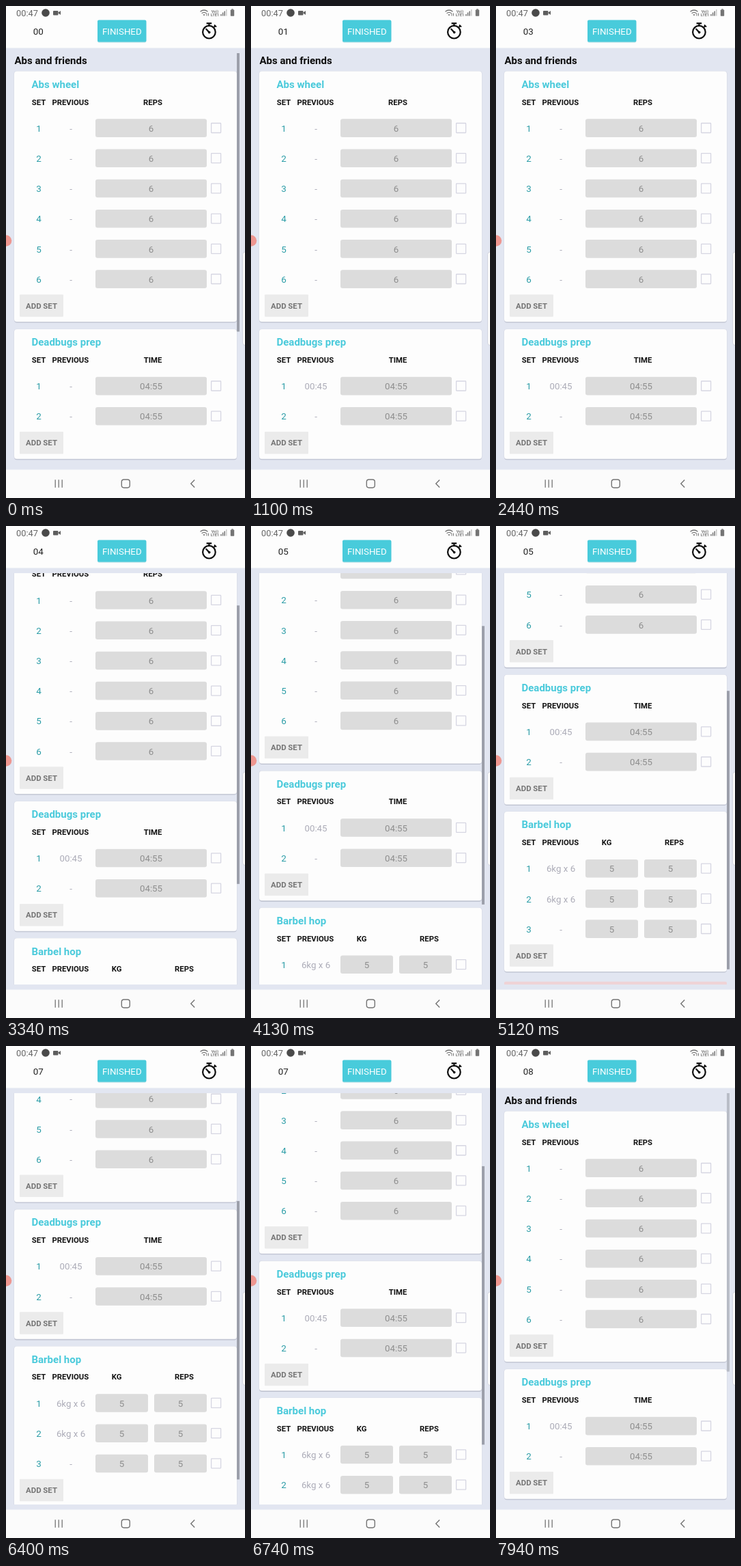
An HTML page that plays this animation: 350 px wide and 720 px high, repeating every 8 s.

```html
<!DOCTYPE html>
<html lang="en">
<head>
<meta charset="utf-8">
<title>Workout log</title>
<style>
html, body { margin: 0; width: 100%; height: 100%; overflow: hidden; background: #fbfbfb; }
svg { display: block; width: 350px; height: 720px; font-family: Roboto, Arial, sans-serif; }
</style>
</head>
<body>
<svg id="stage" viewBox="0 0 350 720" xmlns="http://www.w3.org/2000/svg"></svg>
<script>
const LOOP = 8000;
const ROW = 44.2;
const PAGE = '#e2e6f1', TEAL = '#4acadb', NUMBER = '#2a9ca6', FIELD = '#dcdcdc';
const MUTED = '#acacb8', VALUE = '#8e8e8e', ICON = '#747474';

const rect = (x, y, w, h, fill, r = 0, extra = '') =>
  `<rect x="${x}" y="${y}" width="${w}" height="${h}" rx="${r}" fill="${fill}" ${extra}/>`;
const path = (d, stroke, width, extra = '') =>
  `<path d="${d}" fill="none" stroke="${stroke}" stroke-width="${width}" ${extra}/>`;
// y is the middle of the capital letters
const text = (s, x, y, size, fill, weight = 400, anchor = 'middle', extra = '') =>
  `<text x="${x}" y="${(y + size * 0.355).toFixed(2)}" font-size="${size}" fill="${fill}" font-weight="${weight}" text-anchor="${anchor}" ${extra}>${s}</text>`;

// Each column: label, label x, field x, field width, value
function card(top, title, cols, prev) {
  const first = top + 83;
  const last = first + ROW * (prev.length - 1);
  const height = last + 62.5 - top;
  let out = rect(12, top + 1.6, 326, height, '#b4b8c6', 4, 'opacity=".8"')
    + rect(11.5, top - 0.3, 327, height + 0.8, '#d3d7e2', 4)
    + rect(12, top, 326, height, '#fdfdfd', 4)
    + text(title, 37.5, top + 19, 15, TEAL, 700, 'start')
    + text('SET', 48, top + 45, 11.3, '#111', 700)
    + text('PREVIOUS', 94.3, top + 45, 11.3, '#111', 700);
  for (const [label, x] of cols) out += text(label, x, top + 45, 11.3, '#111', 700);
  prev.forEach((p, i) => {
    const y = first + ROW * i;
    out += text(i + 1, 48, y + 0.5, 13.4, NUMBER)
      + text(p.s, 95, y + 0.5, 13.3, MUTED, 400, 'middle', p.id ? `id="${p.id}"` : '');
    for (const [, , x, w, v] of cols)
      out += rect(x, y - 13.2, w, 26.6, FIELD, 3) + text(v, x + w / 2, y + 0.5, 13.3, VALUE);
    out += rect(300.6, y - 7, 14, 14, 'none', 0.5, 'stroke="#d6d6e2" stroke-width="1.3"');
  });
  out += rect(20, last + 22.8, 64, 32.5, '#ebebeb', 1)
    + text('ADD SET', 52, last + 39.2, 11.4, '#757575', 700);
  return out;
}

const dash = () => ({ s: '-' });
const one = (label, v) => [[label, 215, 131, 163, v]];
const content = text('Abs and friends', 12.5, 80, 15, '#0c0c0c', 700, 'start')
  + card(95.5, 'Abs wheel', one('REPS', '6'), Array.from({ length: 6 }, dash))
  + card(473, 'Deadbugs prep', one('TIME', '04:55'), [{ s: '-', id: 'loaded' }, dash()])
  + card(673.3, 'Barbel hop', [['KG', 162, 131, 77, '5'], ['REPS', 261, 217, 77, '5']],
      [{ s: '6kg x 6' }, { s: '6kg x 6' }, dash()])
  + rect(12, 922, 326, 32, '#efd3d6', 2);

const statusBar = text('00:47', 15, 10.5, 12.8, '#666', 400, 'start')
  + '<circle cx="58" cy="10" r="5.8" fill="#4a4a4a"/>'
  + rect(69, 7, 7.5, 6.4, '#5e5e5e', 1) + '<path d="M76 10l4-3v6z" fill="#5e5e5e"/>'
  + path('M284.5 8.3q5.5-4.6 11 0M286.6 10.7q3.4-2.8 6.8 0', ICON, 1.3)
  + `<path d="M288.2 12.2h3.6l-1.8 2.2z" fill="${ICON}"/>`
  + path('M294 14.5v-4m2.5 0v4', ICON, 1)
  + text('Vo))', 306, 7.6, 5.6, ICON, 700) + text('LTE1', 306, 13, 5.6, ICON, 700)
  + path('M315 14.5v-2.5M317.6 14.5v-5M320.2 14.5v-7', ICON, 1.5)
  + path('M322.8 14.5v-9.5', '#c6c6c6', 1.5)
  + rect(328.8, 5.5, 5.4, 9.2, ICON, 0.8) + rect(330.2, 4.3, 2.6, 1.4, ICON);

const stopwatch = '<circle cx="297.4" cy="38.2" r="9.3" fill="none" stroke="#0b0b0b" stroke-width="2.2"/>'
  + path('M297.4 28.8v-3.2M293.6 25.3h7.6', '#0b0b0b', 2.2)
  + path('M304.4 31l2.2-2.2M305 27.6l3 3', '#0b0b0b', 2)
  + path('M297.8 38.8l-4.6-5', '#0b0b0b', 2.2, 'stroke-linecap="round"')
  + '<circle cx="297.7" cy="38.6" r="1.8" fill="#0b0b0b"/>';

const header = rect(0, 0, 350, 61, '#fdfdfd') + rect(0, 61, 350, 1, '#eef0f6')
  + statusBar
  + text('00', 47.3, 37.3, 13.4, '#222', 400, 'middle', 'id="timer"')
  + rect(134, 21.4, 71.4, 32, '#b4dfe6', 2) + rect(134, 20.6, 71.4, 32, '#48cbdb', 2)
  + text('FINISHED', 169.8, 37.3, 13.3, '#fff')
  + stopwatch;

const navBar = rect(0, 678.5, 350, 41.5, '#fbfbfb')
  + path('M72.2 693.3v11.4M77.2 693.3v11.4M82.2 693.3v11.4', ICON, 1.3)
  + rect(169.3, 693, 12, 12, 'none', 3.4, `stroke="${ICON}" stroke-width="1.4"`)
  + path('M276.2 693.4l-5.4 5.6 5.4 5.6', ICON, 1.4);

const edges = '<circle cx="0" cy="343.5" r="8.3" fill="#ee9690"/>'
  + rect(346.5, 360, 10, 136.5, '#fbfbfb', 3.5, 'stroke="#d2d5df" stroke-width="1"');

document.getElementById('stage').innerHTML =
  '<defs><clipPath id="view"><rect x="0" y="69" width="350" height="602"/></clipPath></defs>'
  + rect(0, 0, 350, 720, PAGE)
  + `<g clip-path="url(#view)"><g id="list">${content}</g></g>`
  + rect(338, 69, 4, 407.5, '#8d919c', 0, 'id="bar"')
  + header + navBar + edges;

const list = document.getElementById('list');
const bar = document.getElementById('bar');
const timer = document.getElementById('timer');
const loaded = document.getElementById('loaded');

// Scroll offset over time: a slow drag, a fling to the end, then back up. [ms, px]
const stops = [[0, 0], [2480, 0], [3340, 70], [4740, 160], [5120, 255], [5330, 288],
  [5950, 288], [6400, 234], [7540, 0], [8000, 0]];
const ticks = [410, 1410, 2430, 3300, 4060, 5400, 6380, 7460];

const slope = i => (stops[i + 1][1] - stops[i][1]) / (stops[i + 1][0] - stops[i][0]);
function tangent(i) {
  if (i === 0 || i === stops.length - 1) return 0;
  const a = slope(i - 1), b = slope(i);
  return a * b <= 0 ? 0 : 2 * a * b / (a + b);
}
function scrollAt(t) {
  let i = 0;
  while (i < stops.length - 2 && t >= stops[i + 1][0]) i++;
  const [t0, a] = stops[i], [t1, b] = stops[i + 1];
  const w = t1 - t0, u = (t - t0) / w, v = 1 - u;
  return v * v * (1 + 2 * u) * a + u * u * (3 - 2 * u) * b
    + u * v * w * (v * tangent(i) - u * tangent(i + 1));
}

const fade = (t, start) => Math.max(0, Math.min(1, 1 - (t - start) / 250));

function draw(t) {
  const s = scrollAt(t);
  list.setAttribute('transform', `translate(0 ${-s.toFixed(2)})`);
  bar.setAttribute('y', 69 + s * 0.675);
  bar.setAttribute('opacity', 0.82 * (t < 2480 ? fade(t, 70) : fade(t, 7840)));
  timer.textContent = '0' + ticks.filter(k => t >= k).length;
  loaded.textContent = t < 600 ? '-' : '00:45';
}

const begin = performance.now();
function frame() {
  draw((performance.now() - begin) % LOOP);
  requestAnimationFrame(frame);
}
frame();
</script>
</body>
</html>
```
